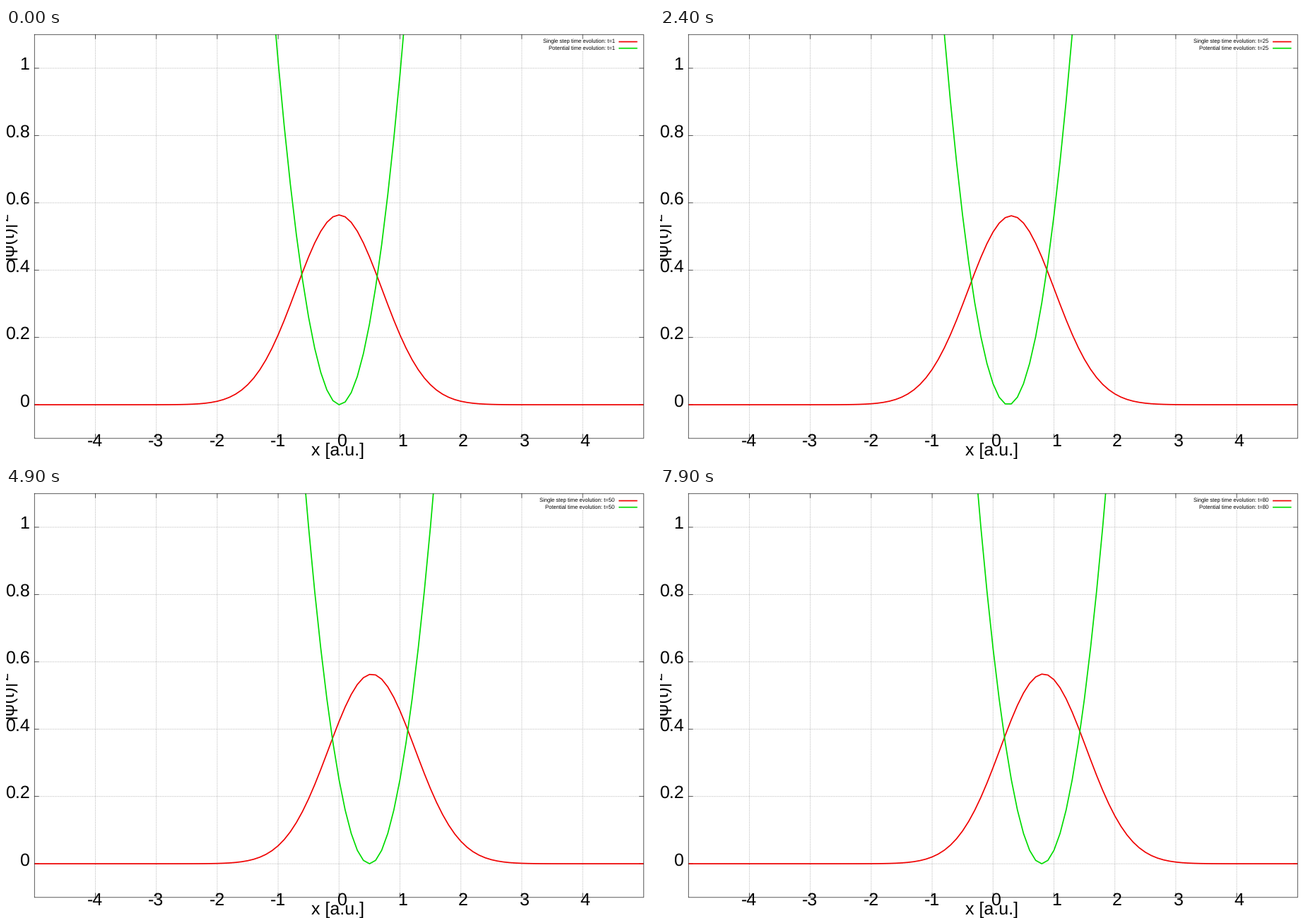
Write a matplotlib script that moves like this. It is 917x611 px and loops after 8000 ms.

```python
import numpy as np
import matplotlib.pyplot as plt
from matplotlib.animation import FuncAnimation

W, H, DPI = 917, 611, 100
FRAMES, INTERVAL = 80, 100
LEFT, RIGHT, TOP, BOTTOM = 40.3, 902.3, 9.3, 581.8
XMIN, XMAX, YMIN, YMAX = -5, 5, -0.1, 1.1
RED, GREEN, GRID, FRAME = "#f00000", "#00dc00", "#c0c0c0", "#333333"
BIG, SMALL = 25, 7.6
DT, SPEED = 0.2, 0.01

plt.rcParams["font.family"] = "Liberation Sans"
plt.rcParams["text.hinting"] = "none"

fig = plt.figure(figsize=(W / DPI, H / DPI), dpi=DPI, facecolor="white")
ax = fig.add_axes([0, 0, 1, 1])
ax.set(xlim=(0, W), ylim=(H, 0))
ax.axis("off")


def pt(px):
    return px * 72 / DPI


def sx(x):
    return LEFT + (x - XMIN) * (RIGHT - LEFT) / (XMAX - XMIN)


def sy(y):
    return BOTTOM - (y - YMIN) * (BOTTOM - TOP) / (YMAX - YMIN)


def line(xs, ys, color, width, **kw):
    return ax.plot(xs, ys, color=color, lw=pt(width), snap=False, **kw)[0]


def label(x, y, text, size=BIG, **kw):
    return ax.text(x, y, text, fontsize=pt(size), va="baseline", zorder=6, **kw)


def advance(text):
    """Pen width of a number at the big size."""
    em = {"-": 0.333, ".": 0.278, " ": 0.278}
    return BIG * sum(em.get(c, 0.556) for c in text)


def draw_axes():
    tick = 6
    dots = dict(dashes=(1.2, 1.2), zorder=1)
    for x in range(-4, 5):
        px = sx(x)
        start = 33 if x == 4 else TOP  # keep the key area clear
        line([px, px], [start, BOTTOM], GRID, 1, **dots)
        line([px, px], [TOP, TOP + tick], FRAME, 0.8)
        line([px, px], [BOTTOM, BOTTOM - tick], FRAME, 0.8)
        text = f"{x: d}"
        pen = px - advance(text) / 2 - 0.2
        if x >= 0:
            pen += advance(" ")
        label(pen, 593, text.strip())
    for y in np.arange(6) / 5:
        py = sy(y)
        line([LEFT, RIGHT], [py, py], GRID, 1, **dots)
        line([LEFT, LEFT + tick], [py, py], FRAME, 0.8)
        line([RIGHT, RIGHT - tick], [py, py], FRAME, 0.8)
        text = f"{y:g}"
        label(33.3 - advance(text), py + 2.2, text)
    line([LEFT, RIGHT, RIGHT, LEFT, LEFT],
         [TOP, TOP, BOTTOM, BOTTOM, TOP], FRAME, 0.8, zorder=5)

    label(432, 606, "x [a.u.]")
    turned = dict(rotation=90, rotation_mode="anchor")
    label(9, 328, "|ψ(t)|", **turned)
    label(3, 273, "2", 20, **turned)


def wave_centers(n):
    """Strang-split oscillator dragged by a trap moving at constant speed."""
    x = p = 0.0
    out = []
    for step in range(1, n + 1):
        trap = SPEED * step
        p -= DT / 2 * (x - trap)
        x += DT * p
        p -= DT / 2 * (x - trap)
        out.append(x)
    return out


draw_axes()
grid = np.linspace(XMIN, XMAX, 101)
centers = wave_centers(FRAMES)
omega = np.arccos(1 - DT**2 / 2)

clip = plt.Rectangle((LEFT, TOP - 0.5), RIGHT - LEFT, BOTTOM - TOP,
                     transform=ax.transData)
curves, keys = [], []
for row, (color, name) in enumerate([(RED, "Single step"), (GREEN, "Potential")]):
    curve = line([], [], color, 1.7, zorder=3 + row, solid_joinstyle="round")
    curve.set_clip_path(clip)
    curves.append(curve)
    y = 19.5 + 9.2 * row
    line([867, 893.5], [y, y], color, 1.7, solid_capstyle="butt")
    keys.append((name, label(861.5, 21.7 + 9 * row, "", SMALL, ha="right")))


def update(i):
    t = i + 1
    var = np.cos(omega * t)**2 + np.sin(omega * t)**2 / (1 - DT**2 / 4)
    wave = np.exp(-(grid - centers[i])**2 / var) / np.sqrt(np.pi * var)
    trap = (grid - SPEED * t)**2
    for curve, values in zip(curves, (wave, trap)):
        curve.set_data(sx(grid), sy(values))
    for name, text in keys:
        text.set_text(f"{name} time evolution: t={t}")
    return curves + [text for _, text in keys]


anim = FuncAnimation(fig, update, frames=FRAMES, interval=INTERVAL,
                     repeat=True, repeat_delay=0)
plt.show()
```
